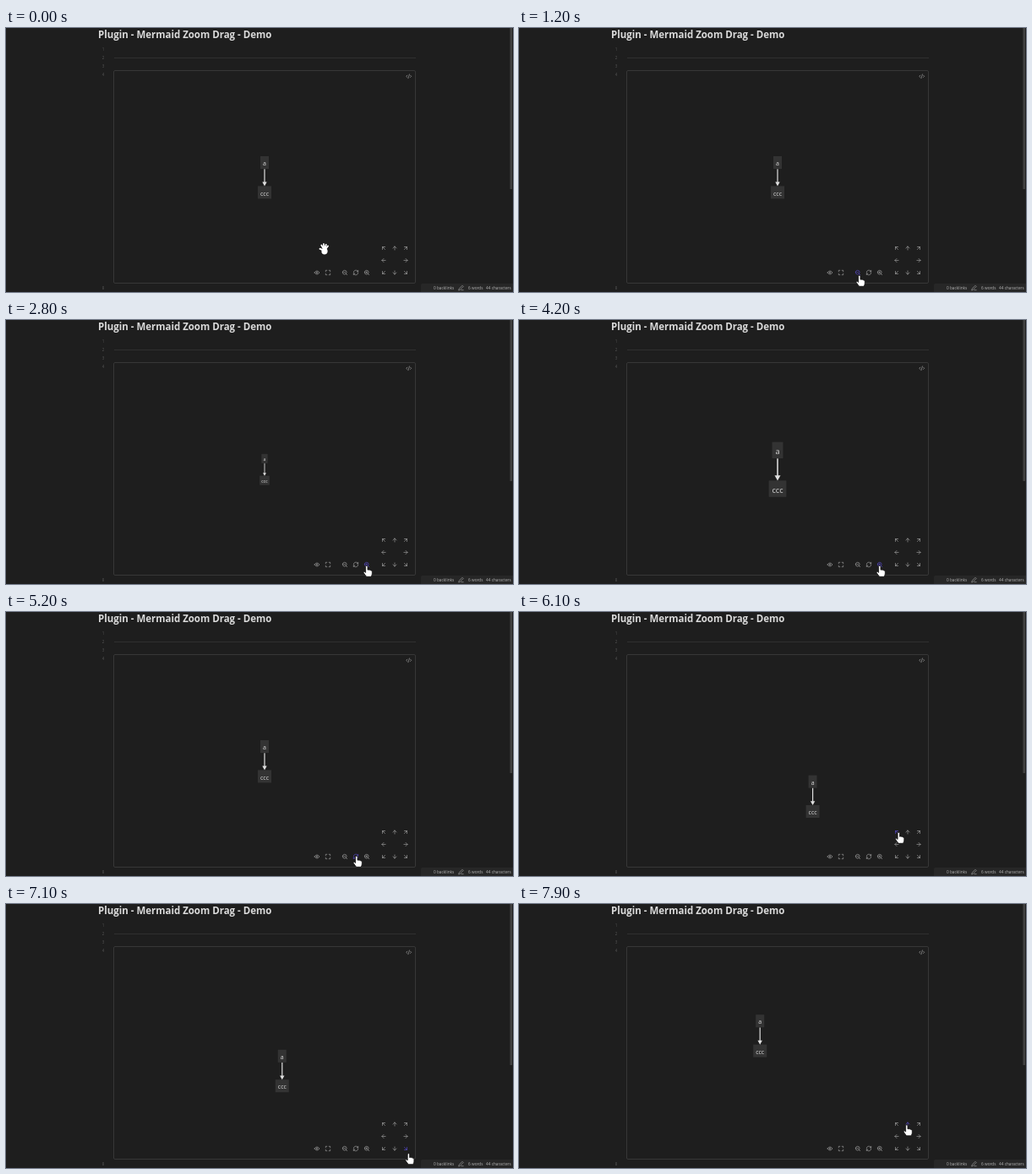
An HTML page for the animation above (8 s loop, 600x313 px).

```html
<!DOCTYPE html>
<html lang="en">
<head>
<meta charset="utf-8">
<title>Mermaid Zoom Drag</title>
<style>
  html, body { margin: 0; width: 100%; height: 100%; overflow: hidden; background: #1e1e1e; }
  svg { display: block; width: 100vw; height: 100vh; font-family: "Open Sans", "Noto Sans", sans-serif; }
  .title { font-size: 11.48px; font-weight: 700; fill: #dadada; }
  .gutter { font-size: 4.6px; fill: #555; text-anchor: middle; }
  .status { font-size: 4.75px; fill: #b4b4b4; }
  .icon { fill: none; stroke: #adadad; stroke-width: 2; stroke-linecap: round; stroke-linejoin: round; }
  .icon.hover { stroke: #5d4fd6; }
  .node { fill: #333; }
  .label { font-size: 7px; fill: #dadada; text-anchor: middle; }
  .pointer { fill: #fff; stroke: #111; stroke-width: .8; stroke-linejoin: round; }
  .hand { fill: #fff; stroke: #fff; stroke-width: 1.9; stroke-linecap: round; }
  .hand.outline { stroke: #111; stroke-width: 3.2; }
</style>
</head>
<body>
<svg viewBox="0 0 600 313">
  <rect width="600" height="313" fill="#1e1e1e"/>
  <text class="title" x="109" y="12">Plugin - Mermaid Zoom Drag - Demo</text>
  <g id="gutter"></g>
  <path d="M128 35.5H485" stroke="#303030"/>
  <rect x="127.5" y="50.5" width="357" height="252" rx="1.5" fill="none" stroke="#373737"/>
  <rect x="596.5" width="2.5" height="191" fill="#424242"/>

  <g id="diagram">
    <rect class="node" x="-5" y="-25.2" width="10" height="15"/>
    <rect class="node" x="-8" y="10.2" width="16" height="15"/>
    <path d="M0 -10V7" stroke="#dedede" stroke-width="1.2"/>
    <path d="M-2.7 5.4H2.7L0 10.3Z" fill="#dedede"/>
    <text class="label" y="-14.2">a</text>
    <text class="label" y="21.4">ccc</text>
  </g>

  <path d="M491 313V305Q491 303 493 303H600V313Z" fill="#272727"/>
  <g class="status">
    <text x="506" y="309.9">0 backlinks</text>
    <text x="547" y="309.9">6 words</text>
    <text x="568" y="309.9">44 characters</text>
  </g>
  <g id="icons"></g>

  <g id="hand"></g>
  <path id="pointer" class="pointer" d="M-1.2 1.2A1.2 1.2 0 0 1 1.2 1.2V5Q2.1 4.3 3 5Q4.2 4.6 4.9 5.6Q6.4 5.4 6.5 7V9.5Q6.4 11 5.3 13H-.2Q-1.8 11 -3.6 8.4Q-4 6.8 -2.6 7L-1.2 8.2Z"/>
</svg>
<script>
const LOOP = 8000, TICK = 100, PAN = 20.8;
const $ = id => document.getElementById(id);
const clamp = (v, lo, hi) => Math.min(hi, Math.max(lo, v));
const ease = k => k * k * (3 - 2 * k);

function add(parent, tag, attrs, text = '') {
  const el = document.createElementNS('http://www.w3.org/2000/svg', tag);
  for (const key in attrs) el.setAttribute(key, attrs[key]);
  el.textContent = text;
  parent.append(el);
  return el;
}

const lineNumber = (n, y) => add($('gutter'), 'text', { class: 'gutter', x: 115, y }, n);
for (let n = 1; n <= 4; n++) lineNumber(n, 17 + 10 * n);
lineNumber(8, 309.5);

// Icons share a 24-unit grid.
const circle = (x, y, r) => `M${x - r} ${y}a${r} ${r} 0 1 0 ${2 * r} 0a${r} ${r} 0 1 0 ${-2 * r} 0`;
const lens = circle(11, 11, 8) + 'M21 21l-4.3 -4.3M8 11h6';
const shapes = {
  code: 'M18 16l4 -4l-4 -4M6 8l-4 4l4 4M14.5 4l-5 16',
  pencil: 'M3 21l1.5 -5.5L17 3l4 4L8.5 19.5ZM13 21h8',
  eye: 'M2 12q10 -14 20 0q-10 14 -20 0' + circle(12, 12, 3),
  expand: 'M8 3H3v5M21 8V3h-5M3 16v5h5M16 21h5v-5',
  zoomOut: lens,
  zoomIn: lens + 'M11 8v6',
  refresh: 'M3 12a9 9 0 0 1 16 -6L21 8M21 3v5h-5M21 12a9 9 0 0 1 -16 6L3 16M8 16H3v5',
  arrow: 'M5 12h14M12 5l7 7l-7 7'
};

function icon(name, x, y, turn = 0) {
  const transform = `translate(${x} ${y}) rotate(${turn}) scale(.3) translate(-12 -12)`;
  return { x, y, el: add($('icons'), 'path', { class: 'icon', d: shapes[name], transform }) };
}

icon('code', 476.7, 57.3);
icon('pencil', 538.5, 308);
const buttons = [
  ...['eye', 'expand'].map((name, i) => icon(name, 368 + 13 * i, 290)),
  ...['zoomOut', 'refresh', 'zoomIn'].map((name, i) => icon(name, 401 + 13 * i, 290))
];
for (let row = -1; row <= 1; row++) {
  for (let col = -1; col <= 1; col++) {
    if (!row && !col) continue;
    buttons.push(icon('arrow', 460 + 13 * col, 275.5 + 14.5 * row, Math.atan2(row, col) * 180 / Math.PI));
  }
}

// Open hand: five fingers fanned from the palm.
let fingers = '';
for (let i = 0; i < 5; i++) {
  const angle = (i ? -52 + 22 * i : -68) * Math.PI / 180;
  const length = i ? 8 - Math.abs(i - 2) * .6 : 6;
  fingers += `M0 2L${length * Math.sin(angle)} ${2 - length * Math.cos(angle)}`;
}
for (const layer of ['hand outline', 'hand']) {
  add($('hand'), 'path', { class: layer, d: fingers });
  add($('hand'), 'ellipse', { class: layer, cy: 2.8, rx: 2.7, ry: 2.8 });
}

// Each visit: the cursor travels to a spot, then clicks at a steady pace.
const visits = [
  { x: 377, y: 262, leave: 0, arrive: 0 },
  { x: 402.8, y: 293.3, leave: 400, arrive: 1200, first: 1700, gap: 250, count: 3, zoom: .9 },
  { x: 426.8, y: 291.3, leave: 2200, arrive: 2800, first: 2840, gap: 260, count: 7, zoom: 1.1 },
  { x: 414.8, y: 289.3, leave: 4400, arrive: 5000, first: 5100, gap: 1, count: 1, reset: true },
  { x: 449.3, y: 261.3, leave: 5200, arrive: 5800, first: 5800, gap: 300, count: 2, pan: 1 },
  { x: 476.4, y: 295.7, leave: 6200, arrive: 7000, first: 7000, gap: 250, count: 3, pan: -1 },
  { x: 458.8, y: 261.8, leave: 7500, arrive: 7900 }
];

function diagramAt(t) {
  let scale = 1, pan = 0;
  for (const v of visits) {
    if (!(t >= v.first)) continue;
    const done = Math.min(v.count, Math.floor((t - v.first) / v.gap) + 1);
    scale = v.reset ? 1 : scale * (v.zoom || 1) ** done;
    pan += (v.pan || 0) * done * PAN;
  }
  return { scale, pan };
}

function cursorAt(t) {
  let { x, y } = visits[0];
  for (const v of visits.slice(1)) {
    const k = ease(clamp((t - v.leave) / (v.arrive - v.leave), 0, 1));
    x += (v.x - x) * k;
    y += (v.y - y) * k;
  }
  return [x, y];
}

function draw(t) {
  const { scale, pan } = diagramAt(t);
  $('diagram').setAttribute('transform', `translate(${306 + pan} ${177.2 + pan}) scale(${scale})`);

  const [x, y] = cursorAt(t);
  const target = buttons.find(b => Math.abs(b.x - x) < 6.5 && Math.abs(b.y - y) < 6.5);
  for (const b of buttons) b.el.classList.toggle('hover', b === target);
  for (const id of ['hand', 'pointer']) {
    $(id).setAttribute('transform', `translate(${x} ${y})`);
    $(id).style.display = (id === 'pointer') === !!target ? '' : 'none';
  }
}

const start = performance.now();
function loop() {
  const t = (performance.now() - start) % LOOP;
  draw(Math.floor(t / TICK) * TICK);
  requestAnimationFrame(loop);
}
loop();
</script>
</body>
</html>
```
